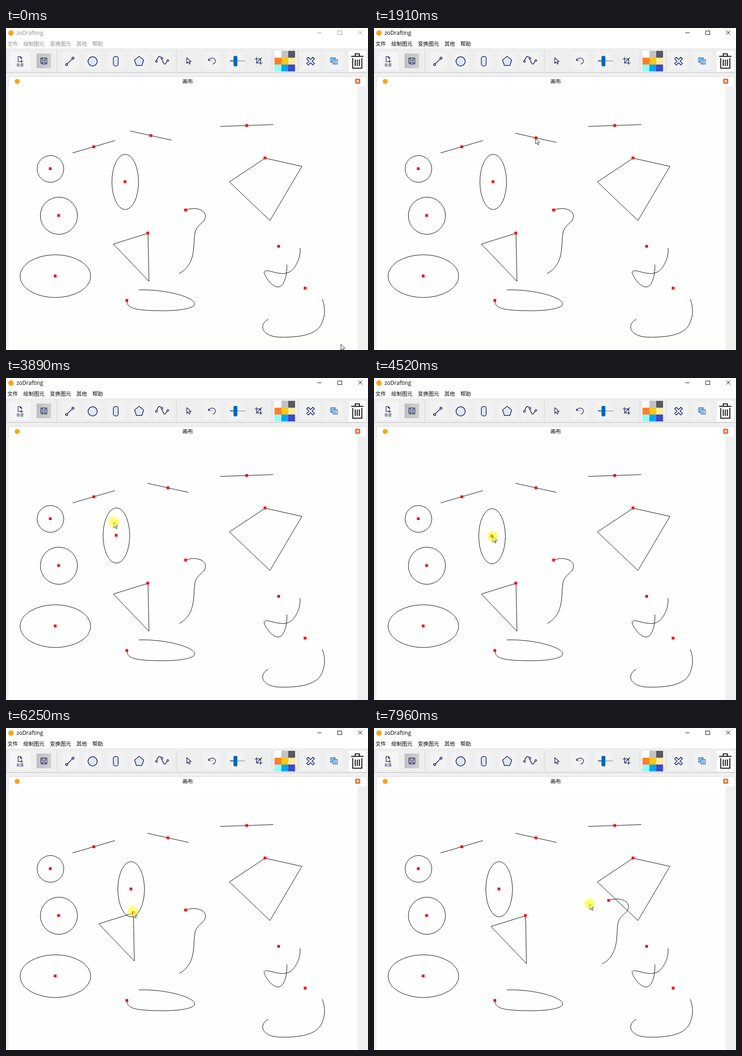
An HTML page for the animation above (8000 ms loop, 794x705 px).

```html
<!DOCTYPE html>
<html lang="zh">
<head>
<meta charset="utf-8">
<title>Drawing board</title>
<style>
html, body { margin: 0; width: 100%; height: 100%; overflow: hidden; background: #f0f0f0; }
svg { display: block; width: 794px; height: 705px; }
text { font-family: "Noto Sans CJK SC", "Noto Sans CJK", "Noto Sans", sans-serif; font-size: 11.6px; }
.latin { font-family: "Open Sans", "Noto Sans", sans-serif; font-size: 12px; }
.icon { fill: none; stroke: #1c1c5c; stroke-width: 1.5; stroke-linejoin: round; stroke-linecap: round; }
.thin { stroke-width: 1.25; }
.pale { fill: #dfe8fa; }
.shape { fill: none; stroke: #000; }
.mark { fill: #f00; stroke: none; }
</style>
</head>
<body>
<svg viewBox="0 0 794 705">
  <rect width="794" height="45" fill="#fff"/>
  <circle cx="11" cy="11" r="6" fill="#f5a623"/>
  <g id="title">
    <text class="latin" x="23" y="15">zoDrafting</text>
    <g id="menu"></g>
  </g>
  <path id="buttons" d="M683 10.5H692M727.5 6.5H736.5V14.5H727.5ZM772.5 5.5L781.5 14.5M781.5 5.5L772.5 14.5" fill="none"/>

  <rect y="45" width="794" height="53" fill="#eee"/>
  <path d="M0 45.5H794" stroke="#e2e2e2"/>
  <path d="M0 97.5H794" stroke="#c0c0c0"/>
  <path d="M1.5 49V95" stroke="#b0b0b0" stroke-dasharray="1 2"/>
  <path d="M111.5 49V95M373.5 49V95M583.5 49V95M640.5 49V95" stroke="#d4d4d4"/>
  <g id="tiles" fill="#f2f2f2"></g>
  <rect x="8" y="52" width="46" height="40" fill="#f5f5f5"/>
  <linearGradient id="steel"><stop stop-color="#bfbfc3"/><stop offset="1" stop-color="#d0d0d2"/></linearGradient>
  <rect x="67" y="56" width="32" height="32" fill="url(#steel)"/>
  <rect x="752" y="50" width="37" height="45" fill="#fff"/>
  <text x="31" y="84" text-anchor="middle" style="font-size:7.8px" fill="#33335c">新建</text>
  <g class="icon">
    <path class="thin" d="M30 73.5H26.5V62.5H31.5L34.5 65.5V68M31.5 62.5V65.5H34.5M34 70V76M31 73H37"/>
    <path class="thin" d="M76.5 65.5H89.5V78.5H78.5L76.5 76.5ZM79.5 65.5V70.5H86.5V65.5M79.5 78V74.5H86.5V78"/>
    <path d="M134.5 78.5L145.5 67.5"/>
    <circle class="pale" cx="133" cy="80" r="2.2"/><circle class="pale" cx="147" cy="66" r="2.2"/>
    <circle class="pale" cx="190" cy="73" r="10"/>
    <rect class="pale" x="235.5" y="62.5" width="10.5" height="20.5" rx="4"/>
    <path class="pale" d="M292 62L302 70L298 82H286L282 70Z"/>
    <path d="M330 73C333 62 338 59 341 66S346 82 350 78S352 71 355 71"/>
    <g class="pale thin"><circle cx="330" cy="73" r="2"/><circle cx="342" cy="66" r="2"/><circle cx="355" cy="71" r="2"/></g>
    <path class="thin" d="M396.5 65V77.5L399.5 74.5L402 79L404 78L402 73.5H406Z"/>
    <path class="thin" d="M445.5 70A7.5 7.5 0 0 1 459.5 71.5A8 8 0 0 1 453.5 79M444 67V71H448M452 71.5V72"/>
    <path class="thin" d="M549.5 64V76.5H562M546 67.5H558.5V80M549.5 76.5L561 65"/>
    <path class="pale" d="M663 64L668 69L673 64L676.5 67.5L671.5 72.5L676.5 77.5L673 81L668 76L663 81L659.5 77.5L664.5 72.5L659.5 67.5Z"/>
  </g>
  <path d="M491 72H503" stroke="#0067b8" stroke-width="2"/>
  <path d="M503 72H524" stroke="#aaa" stroke-width="2"/>
  <rect x="499" y="61" width="8.5" height="23" rx="3" fill="#0067b8"/>
  <g id="palette"></g>
  <g fill="#d6e9fb" stroke="#2374bd" stroke-width="1.2">
    <rect x="712" y="65" width="10" height="10"/>
    <path d="M712 70L717 65M712 75L722 65"/>
    <rect x="717" y="69" width="10" height="10"/>
    <path d="M720 69V79M723.5 69V79"/>
  </g>
  <path d="M757 62H784M766 61V56.5H775V61M760.5 66V88H780.5V66M766 69V83M770.5 69V83M775 69V83" fill="none" stroke="#111" stroke-width="2.1" stroke-linejoin="round"/>

  <rect x="5.5" y="106.5" width="786" height="22" fill="#fff" stroke="#dcdcdc"/>
  <circle cx="24.5" cy="117" r="5.5" fill="#f5a623"/>
  <text x="398.5" y="121" text-anchor="middle">画布</text>
  <rect x="766.5" y="111.5" width="10" height="10" rx="1.5" fill="#ee7d45" stroke="#d0562a"/>
  <path d="M769.5 114.5L773.5 118.5M773.5 114.5L769.5 118.5" stroke="#fff" stroke-width="1.5"/>
  <rect x="6" y="128" width="765" height="577" fill="#fefefe"/>
  <rect x="771" y="128" width="23" height="577" fill="#f0f0f0"/>

  <g id="board" class="shape"></g>
  <path id="cursor" d="M.5 .5V13.2L3.5 10.4L5.6 15.2L7.6 14.3L5.5 9.6H9.4Z" fill="#fff" stroke="#222"/>
  <circle id="glow" r="11.5" fill="#ff0" fill-opacity=".52"/>
</svg>
<script>
const LOOP = 8000, LAG = 70, ACTIVE_AT = 370;
const $ = id => document.getElementById(id);
const fill = (id, items, draw) => $(id).innerHTML = items.map(draw).join("");

const shape = (x, y, body, id = "") =>
  `<g id="${id}">${body}<rect class="mark" x="${x - 3}" y="${y - 3}" width="6" height="6"/></g>`;
const oval = (x, y, rx, ry, id) => shape(x - .5, y - .5, `<ellipse cx="${x}" cy="${y}" rx="${rx}" ry="${ry}"/>`, id);
const line = (x1, y1, x2, y2, id) =>
  shape((x1 + x2) / 2, (y1 + y2) / 2, `<path d="M${x1} ${y1}L${x2} ${y2}"/>`, id);
const path = (x, y, d, id) => shape(x, y, `<path d="${d}"/>`, id);

fill("menu", ["文件", "绘制图元", "变换图元", "其他", "帮助"],
  (s, i, all) => `<text x="${3 + 11.65 * (all.slice(0, i).join("").length + i)}" y="39">${s}</text>`);
fill("tiles", [140, 190, 241, 292, 342, 452, 503, 668, 719],
  x => `<rect x="${x - 19}" y="53" width="38" height="38"/>`);
fill("palette", ["#fff", "#c3c3c3", "#585860", "#ff7f27", "#ffc90e", "#fde9a0", "#8ffafd", "#00a8f3", "#3f48cc"],
  (c, i) => `<rect x="${589 + i % 3 * 15}" y="${50 + Math.floor(i / 3) * 15}" width="15" height="15" fill="${c}"/>`);

$("board").innerHTML = [
  line(146, 273.5, 239, 246.5),
  line(272.5, 225.5, 363, 245.5, "line"),
  line(470, 215.5, 586, 211.5),
  oval(97.5, 308.5, 29.3, 29.3),
  oval(116, 411, 40.7, 40.7),
  oval(108.3, 543.3, 77.5, 46.8),
  oval(261.5, 337, 29.2, 60.5, "oval"),
  path(568, 284.5, "M568.5 285L649 303L579 421.5L490 337Z"),
  path(311, 449, "M311.5 449.5L235.5 473L313.5 554.5Z", "triangle"),
  path(394, 398.5, "M394 398.5C414 391 437.500 397 437.500 412C437.500 427 420 428 415 446C409 470 420 516 380 537.500".replace(/00\b/g, ""), "curve"),
  path(265, 596.5, "M265.5 597C265 613 280 619 345 619C390 619 414 612 414 604C414 590 352 571.5 291.5 573.5"),
  path(598, 478, "M645 482C646 495 643 510 632 525C620 542 600 538 585 534C575 531 566 530 566 535C568 545 583 567 597 567C612 567 617 535 616 518"),
  path(656, 569.5, "M694 594C701 615 700 630 692 648C680 672 645 677 605 677C575 677 563 665 563 655C563 648 567 642 575 638")
].join("");

// Pointer strokes through evenly timed points; "drag" names the shape held until "drop".
const stroke = (start, step, points, drag, drop) => ({ start, step, points, drag, drop });
const strokes = [
  stroke(40, 90, [[734, 692], [650, 240], [597, 66]]),
  stroke(360, 275, [[597, 66], [500, 110], [367, 141], [317, 235]]),
  stroke(1440, 330, [[317, 235], [354.5, 240]], "line", 1900),
  stroke(1900, 435, [[354.5, 240], [300, 300], [259, 337]]),
  stroke(2882, 144, [[259, 337], [285, 331], [352, 310], [290, 350], [206, 317], [310, 300], [255, 366],
    [236, 315], [268, 288], [312, 315], [275, 367], [256, 345], [272, 353]], "oval", 4660),
  stroke(4660, 275, [[272, 353], [313, 420], [312, 450]]),
  stroke(5440, 135, [[312, 450], [340, 425], [364, 382], [318, 360], [253, 405], [282, 407],
    [278, 401], [310, 377], [348, 392], [333, 411.5]], "triangle", 6740),
  stroke(6740, 600, [[333, 411.5], [391, 396]]),
  stroke(7560, 100, [[391, 396], [337, 360], [400, 308], [513, 366], [473, 384], [440, 385]], "curve", LOOP)
];

// Catmull-Rom spline, resting at both ends.
function pointAt({ start, step, points }, t) {
  const n = points.length - 1;
  const s = Math.min(n, Math.max(0, (t - start) / step));
  const i = Math.min(n - 1, Math.floor(s)), u = s - i;
  const p = k => points[Math.min(n, Math.max(0, i + k))];
  return [0, 1].map(a => {
    const [q, b, c, d] = [-1, 0, 1, 2].map(k => p(k)[a]);
    return b + u / 2 * (c - q + u * (2 * q - 5 * b + 4 * c - d + u * (3 * (b - c) + d - q)));
  });
}

const move = (el, [x, y]) => el.setAttribute("transform", `translate(${x} ${y})`);

function render(t) {
  const on = t >= ACTIVE_AT;
  $("title").setAttribute("fill", on ? "#000" : "#8c8c8c");
  $("buttons").setAttribute("stroke", on ? "#000" : "#999");

  const now = strokes.filter(s => t >= s.start).pop() || strokes[0];
  const tip = pointAt(now, t);
  move($("cursor"), tip);
  move($("glow"), tip);
  $("glow").style.display = now.drag && t < now.drop ? "" : "none";

  for (const s of strokes.filter(s => s.drag)) {
    const [x, y] = pointAt(s, t - LAG), [x0, y0] = s.points[0];
    move($(s.drag), [x - x0, y - y0]);
  }
}

const begin = performance.now();
function tick() {
  render((performance.now() - begin) % LOOP);
  requestAnimationFrame(tick);
}
tick();
</script>
</body>
</html>
```
